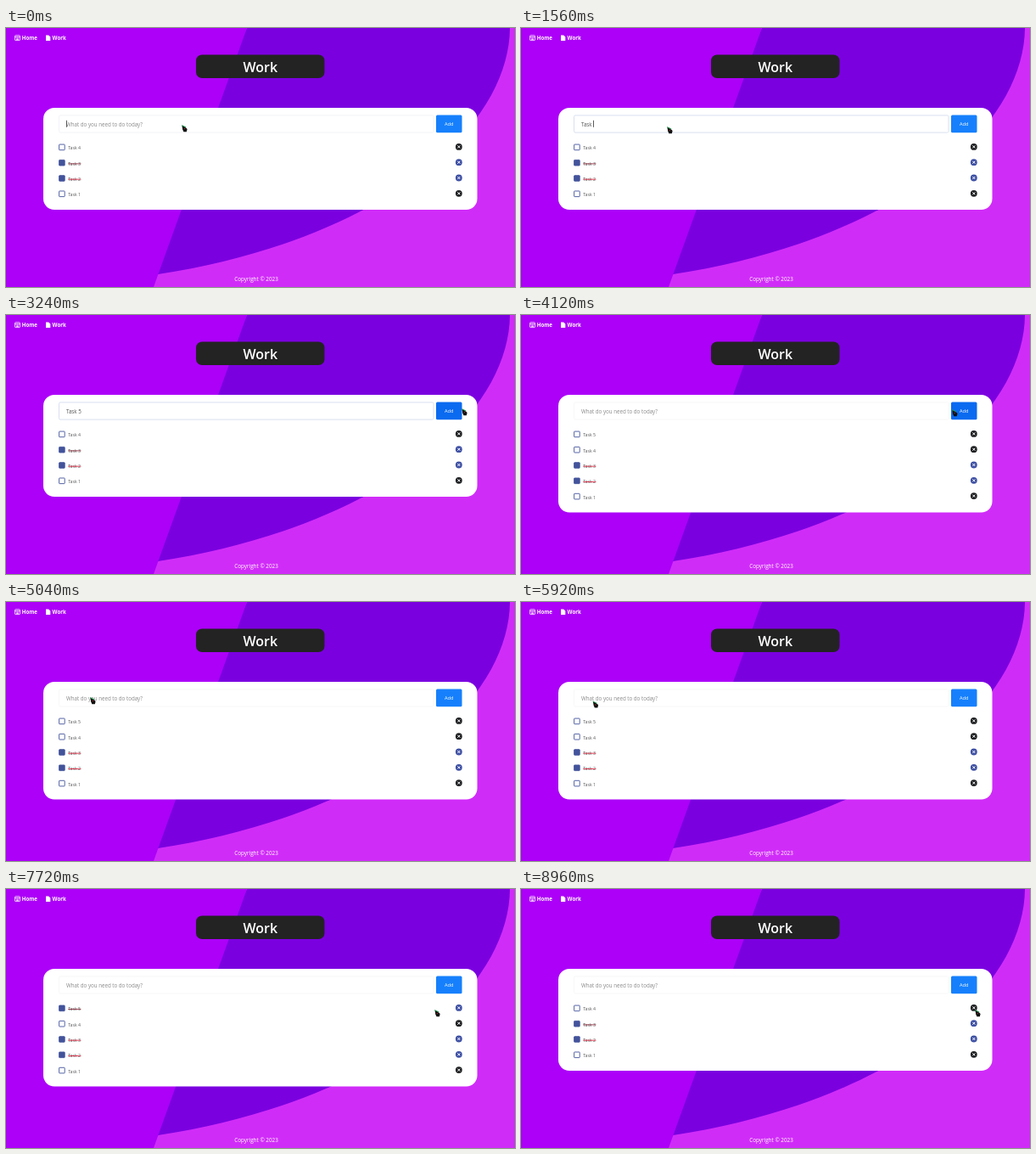
An HTML page for the animation above (9 s loop, 600 by 305 pixels).

```html
<!DOCTYPE html>
<html lang="en">
<head>
<meta charset="utf-8">
<title>Work</title>
<style>
  html, body { margin: 0; width: 100%; height: 100%; overflow: hidden; }
  svg { display: block; width: 600px; height: 305px; font-family: "Open Sans", "Noto Sans", sans-serif; }
</style>
</head>
<body>
<svg viewBox="0 0 600 305">
  <rect width="600" height="305" fill="#d02cf8"/>
  <path fill="#7b00e0" d="M284 0H594C593 120 440 250 179 290L150 300Z"/>
  <path fill="#ac00f8" d="M0 0H284L174 305H0Z"/>

  <g fill="none" stroke="#fff" stroke-width=".8">
    <rect x="10.6" y="8.8" width="5.8" height="5.8" rx=".6"/>
    <path d="M10.6 10.6H16.4M12 12.2H15M12 13.4H15"/>
  </g>
  <path fill="#fff" d="M47 8.4H50.2L52.3 10.5V15H47Z"/>
  <g fill="#fff" font-weight="700" font-size="6.15">
    <text x="18.7" y="13.6">Home</text>
    <text x="54.6" y="13.6">Work</text>
  </g>

  <rect x="224" y="31.5" width="151.5" height="27.5" rx="7" fill="#232323"/>
  <text x="299.8" y="51.7" fill="#fff" font-size="16" font-weight="600" text-anchor="middle">Work</text>
  <text x="295" y="297.6" fill="#fff" font-size="6.35" text-anchor="middle">Copyright © 2023</text>

  <rect id="card" x="44" y="94" width="511.5" rx="13" fill="#fff"/>
  <rect id="field" x="62.5" y="102.9" width="441.5" height="20.2" rx="1.5" fill="#fff" stroke-width=".9"/>
  <text id="entry" x="71" y="115.7" font-size="6.2"></text>
  <rect id="caret" y="108.8" width=".8" height="8" fill="#333"/>
  <rect id="button" x="507" y="102.6" width="30.5" height="20.6" rx="1.5"/>
  <text x="522.2" y="115.2" fill="#fff" font-size="5.6" text-anchor="middle">Add</text>
  <g id="list"></g>
  <g id="cursor">
    <path fill="#2f9a58" d="M0 0L5.4 2.6L1.8 6Z"/>
    <path fill="#111" d="M.6 1.2L5.4 3.8L6.6 5L5.8 8.2H2.4L1.2 5.6Z"/>
    <path fill="#b33" d="M2.6 4.2H4V5H2.6Z"/>
  </g>
</svg>
<script>
const LOOP = 9000, ADDED = 3840, CHECKED = 6840, REMOVED = 8880;
const $ = id => document.getElementById(id);
const set = (id, attrs) => { for (const k in attrs) $(id).setAttribute(k, attrs[k]); };
const clamp = v => Math.min(1, Math.max(0, v));
const mix = (a, b, p) => `rgb(${a.map((v, i) => Math.round(v + (b[i] - v) * p))})`;

// [time, x, y] of the pointer tip
const path = [
  [40, 207, 114], [600, 172, 116], [2280, 172, 116], [3160, 537, 110], [3240, 537, 110],
  [3480, 534, 111], [3960, 534, 111], [5040, 99, 112], [5600, 86, 114], [5760, 86, 114],
  [6640, 69, 141], [6960, 69, 141], [7860, 535, 142], [LOOP, 535, 142]
];
// [time, field text]; each entry restarts the caret blink
const typing = [[0, ""], [760, "T"], [1000, "Ta"], [1280, "Tas"], [1480, "Task"], [1560, "Task "], [2280, "Task 5"]];

function pointerAt(t) {
  const i = path.findIndex(p => p[0] > t);
  if (i < 1) return path[0].slice(1);
  const [t0, x0, y0] = path[i - 1], [t1, x1, y1] = path[i];
  const p = (t - t0) / (t1 - t0), e = p * p * (3 - 2 * p);
  return [x0 + (x1 - x0) * e, y0 + (y1 - y0) * e];
}

function row(n, slot, done, hover) {
  const y = 140.5 + slot * 18.3;
  const strike = slot < 2 ? "#8f3343" : "#dc2f48";
  return `<g transform="translate(0 ${y})">
    <rect x="62.6" y="-3.4" width="6.6" height="6.6" rx=".6" stroke="#43539b" stroke-width=".9"
      fill="${done ? "#43539b" : "#fff"}" opacity="${hover ? .55 : 1}"/>
    <text x="73.2" y="2.9" font-size="5.15" fill="#555">Task ${n}</text>
    ${done ? `<path d="M73.2 1.1H88.4" stroke="${strike}" stroke-width=".9"/>` : ""}
    <circle cx="533.8" cy="-.6" r="3.9" fill="${done ? "#3d4fa3" : "#1d1f21"}"/>
    <path d="M532.3 -2.1l3 3m0 -3l-3 3" stroke="#fff" stroke-width="1"/>
  </g>`;
}

function draw(now) {
  const t = now % LOOP;
  const [x, y] = pointerAt(t);
  const extra = t >= ADDED && t < REMOVED;
  const focused = t < ADDED;
  const focus = focused ? clamp((t + 20) / 150) : 1 - clamp((t - ADDED) / 150);
  const hover = clamp((t - 3060) / 150) * (1 - clamp((t - 4180) / 150));

  const [typedAt, text] = typing.filter(k => k[0] <= t).pop();
  const shown = focused ? text : "";
  const entry = $("entry");
  entry.textContent = (shown || "What do you need to do today?").replace(/ $/, "\u00a0");
  set("entry", { fill: shown ? "#555" : "#888" });
  set("caret", {
    x: 71 + (shown ? entry.getComputedTextLength() : 0),
    opacity: focused && (t - typedAt) % 1060 < 530 ? 1 : 0
  });
  set("field", { stroke: mix([246, 246, 248], [212, 220, 238], focus) });
  set("button", { fill: mix([22, 128, 252], [10, 106, 240], hover) });

  const tasks = extra ? [5, 4, 3, 2, 1] : [4, 3, 2, 1];
  const overBox = t > 6500 && t < CHECKED;
  set("card", { height: extra ? 138.5 : 120 });
  $("list").innerHTML = tasks.map((n, i) =>
    row(n, i, n === 2 || n === 3 || n === 5 && t >= CHECKED, n === 5 && overBox)).join("");
  set("cursor", { transform: `translate(${x} ${y})` });
}

const start = performance.now();
function tick() {
  draw(performance.now() - start);
  requestAnimationFrame(tick);
}
tick();
</script>
</body>
</html>
```
